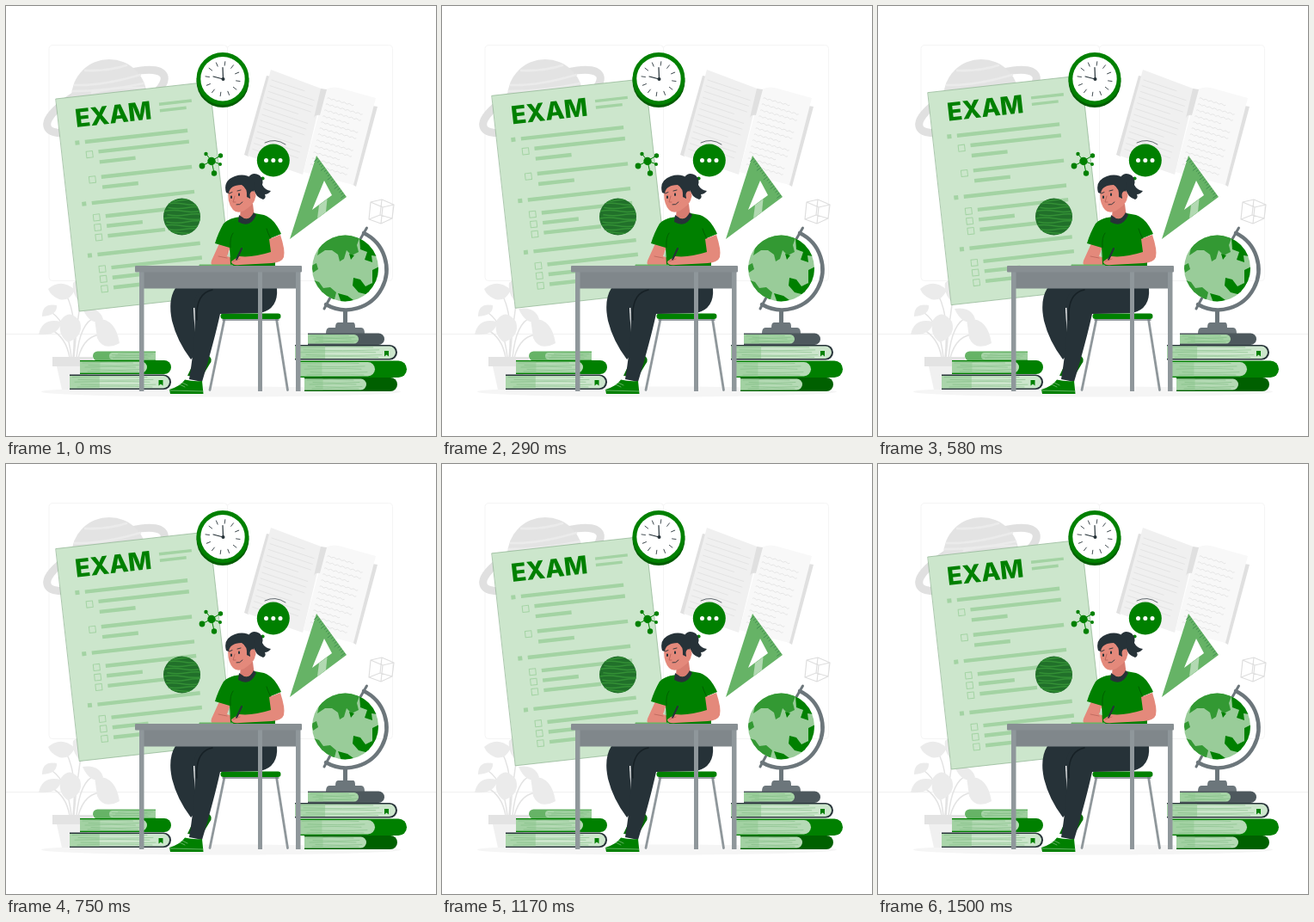
Write an HTML page that moves like this. It is 500 px wide and 500 px high and loops after 1540 ms.

```html
<!DOCTYPE html>
<html lang="en">
<head>
<meta charset="utf-8">
<title>Exam</title>
<style>
  html, body { margin: 0; width: 100%; height: 100%; overflow: hidden; background: #fff; }
  svg { display: block; width: 100%; height: 100%; }
  text { font: 800 29px Inter, "Open Sans", sans-serif; }
</style>
</head>
<body>
<svg viewBox="0 0 500 500" fill="none" stroke-linecap="round" stroke-linejoin="round">
  <defs>
    <clipPath id="ballClip"><circle cx="204.5" cy="245" r="21.5"/></clipPath>
    <clipPath id="globeClip"><circle cx="394.5" cy="305" r="38.5"/></clipPath>
  </defs>

  <g id="backdrop" stroke="#f5f5f5">
    <rect x="50" y="45.500" width="207.500" height="274" rx="4"/>
    <rect x="257.500" y="45.500" width="192" height="274" rx="4"/>
    <path d="M0 381.500H500" stroke="#f1f1f1"/>
  </g>
  <ellipse cx="250" cy="448.500" rx="209" ry="6" fill="#f5f5f5"/>

  <g id="planet">
    <ellipse cx="116" cy="111" rx="74" ry="23" transform="rotate(-24 116 111)" stroke="#e0e0e0" stroke-width="9"/>
    <circle cx="120" cy="106" r="44" fill="#e3e3e3"/>
    <path d="M80 92q32 1 76-12M78 99q40 0 82-9M92 75q26 1 48-6M100 101q24-7 60-6" stroke="#ebebeb" stroke-width="2.500"/>
  </g>

  <g id="plant" fill="#ebebeb" stroke="#e3e3e3" stroke-width="1.500">
    <path d="M78 409Q83 360 70 336M76 409Q72 370 54 357M74 409Q70 385 52 376M79 409Q82 370 90 322M82 409Q86 368 104 362M84 409Q92 380 116 382" fill="none"/>
    <g stroke="none">
      <path d="M49 329Q64 316 80 330Q74 344 62 341Q52 337 49 329ZM42 361Q42 345 59 348Q60 360 42 361ZM38 382Q42 362 64 367Q62 384 38 382ZM64 365Q74 351 86 367Q91 384 72 391Q59 382 64 365ZM78 322Q90 312 95 326Q98 342 88 346Q76 336 78 322ZM89 352Q108 349 113 364Q99 374 89 352ZM103 364Q127 361 132 392Q113 402 106 386Z"/>
    </g>
    <path d="M59 419H96L92 446H65Z" fill="#f0f0f0" stroke="none"/>
    <path d="M54 408H101V419H54Z" fill="#e3e3e3" stroke="none"/>
  </g>

  <g id="notebook">
    <path d="M303 81L308 82L282 175L277 173ZM426 116L432 117L407 210L402 207Z" fill="#e0e0e0"/>
    <path d="M308 74L369 97L345 196L281 174Z" fill="#f0f0f0"/>
    <path d="M371 97Q382 92 394 97L430 107L404 208L346 193Z" fill="#f8f8f8"/>
    <path d="M366 96L373 97L365 127Q360 126 358 130Z" fill="#e0e0e0"/>
    <g id="writing" stroke="#e0e0e0" stroke-width=".8"></g>
  </g>

  <g id="cube" stroke="#dedede" stroke-width="1.200">
    <path d="M424 228L437 225L451 231L449 247L436 253L422 248ZM424 228L438 234L451 231M438 234L436 253M437 225L435 243L422 248M435 243L449 247"/>
  </g>

  <g id="sheet"></g>

  <g id="ball" clip-path="url(#ballClip)">
    <circle cx="204.500" cy="245" r="22" fill="#21702a"/>
    <g id="bands" stroke="#339035" stroke-width="1.500"></g>
  </g>

  <g id="molecule">
    <path d="M228 186L239 180L232.500 172M249.500 174L239 180L249 184M239 180L242 194" stroke="#008000"/>
    <g fill="#008000">
      <circle cx="239" cy="180.500" r="4.700"/><circle cx="228" cy="186" r="3.400"/>
      <circle cx="232.500" cy="172" r="2.200"/><circle cx="249.500" cy="174" r="2.700"/>
      <circle cx="249" cy="184" r="2"/><circle cx="242" cy="194.500" r="3.200"/>
    </g>
  </g>

  <g id="clock">
    <circle cx="252" cy="87.500" r="30.500" fill="#005c00"/>
    <circle cx="252" cy="84.500" r="30.500" fill="#008000"/>
    <circle cx="252" cy="84.700" r="25.700" fill="#fff"/>
    <g id="ticks" stroke="#263238" stroke-width=".8"></g>
    <path d="M252.500 85L252 71.500M252.500 85L241 82" stroke="#263238" stroke-width="1.200"/>
    <circle cx="252.500" cy="85" r="2" fill="#263238"/>
  </g>

  <g id="bubble">
    <circle cx="310.800" cy="179.500" r="19" fill="#008000"/>
    <circle cx="298.500" cy="200.500" r="2.100" fill="#008000"/>
    <path d="M301 159Q313 153 325 161" stroke="#263238" stroke-width=".7"/>
    <path d="M302.500 179.500h.01M310.800 179.500h.01M319 179.500h.01" stroke="#fff" stroke-width="5"/>
  </g>

  <g id="setSquare">
    <path fill="#66b366" fill-rule="evenodd" d="M361 174L396 222L330 271ZM370 203L356 237L379 220Z"/>
    <path d="M364 231.500L373.500 224.500L372 239.500L362 247Z" fill="#b2d9b2"/>
    <g id="marks" stroke="#33804a" stroke-width=".7"></g>
  </g>

  <g id="globe">
    <path d="M416 264A47 47 0 1 1 372 347" stroke="#6c767b" stroke-width="4.500"/>
    <path d="M419.500 258L412 271M370 352L377 339" stroke="#6c767b" stroke-width="3"/>
    <path d="M392 352H397V368H404Q406 368 406 374H413Q417 374 417 381H372Q372 374 376 374H383Q383 368 386 368H392Z" fill="#6c767b"/>
    <circle cx="394.500" cy="305" r="38.500" fill="#99cc99"/>
    <g clip-path="url(#globeClip)">
      <path d="M364 281Q378 264 398 266L411 270L408 278L410 286L402 290L396 284L393 294L388 297L386 289L379 284L371 284L362 290ZM355 302L361 299L363 306L357 310ZM355 318L364 321L369 328L377 327L384 333L381 345L364 338Z" fill="#339933"/>
      <path d="M411 270L424 277L432 291L425 290L426 298L417 295L420 286L412 283ZM399 288L405 290L401 295ZM426 307L434 303L433 324L426 322ZM404 316L412 318L418 326L430 320L422 336L410 333L403 325ZM386 334L397 337L404 342L390 345Z" fill="#008000"/>
    </g>
  </g>

  <g id="books"></g>

  <g id="chair">
    <path d="M254 364L237 446.500M314.500 364L327.500 446.500" stroke="#8f979b" stroke-width="2.800"/>
    <path d="M252 365H317" stroke="#737d82" stroke-width="1.500"/>
    <rect x="249.500" y="357.500" width="70" height="6.500" rx="3.200" fill="#008000"/>
  </g>

  <g id="student">
    <path d="M211 430L219 413L236 407Q241 411 237 416L228 431Z" fill="#006b00"/>
    <path d="M197 328H262L250 348L218 351Q219 378 223 402L215 411Q199 390 193 366Q188 342 197 328Z" fill="#263238"/>
    <path d="M315 328Q317 352 296 357L249 358Q242 390 228 437L213 434Q222 380 219 346Q221 329 234 328Z" fill="#263238"/>
    <path d="M222 365Q220 334 240 330" stroke="#172126" stroke-width="1.500"/>
    <path d="M190 446Q203 442 208 434.500Q218 437 228 436L229.500 451H191Z" fill="#008000"/>
    <path d="M190 447L229 448M205 438L211 441M202 440L208 443" stroke="#8fc88f" stroke-width=".7"/>

    <path d="M249 274L239 296Q237 302 243 302H262L266 294L257 291L262 277Z" fill="#e4897b"/>
    <path d="M273 232L287 230L289 246Q280 255 272 246Z" fill="#d87c70"/>
    <path d="M273 245Q260 246 253 253Q247 263 243 276L260 281L261 302H313Q314 288 308 270L320 265Q312 247 300 243L289 241Q281 252 273 245Z" fill="#008000"/>
    <path d="M261 281Q260 269 264 264M308 271Q304 263 303 259" stroke="#005f00"/>
    <path d="M271 243L270 251Q284 259 291 243L288 240Q282 252 274 245Z" fill="#263238"/>
    <path d="M306 271L319 266Q325 284 323 292Q321 298 309 299L272 301Q262 302 262 297L271 291Q286 293 308 286Z" fill="#e4897b"/>
    <path d="M274 282L268 295" stroke="#263238" stroke-width="2"/>
    <path d="M264 297L272 294M247 291L257 293" stroke="#b9655b" stroke-width=".8"/>

    <path d="M282 199Q287 192 295 197Q300 202 298 208Q301 214 308 215Q305 219 301 219Q303 223 299 225Q290 222 288 213Z" fill="#263238"/>
    <path d="M259 210Q256 228 264 237Q269 242 277 238L285 232Q292 225 289 216Q283 203 271 203Z" fill="#e4897b"/>
    <path d="M256 217Q252 203 266 198Q278 194 286 201Q293 208 288 216Q284 213 284 224L280 222Q281 212 274 208Q260 208 259 218Z" fill="#263238"/>
    <ellipse cx="287" cy="220" rx="3.500" ry="4.300" fill="#e4897b"/>
    <path d="M262 221.500v1.500M271 218.500v1.500" stroke="#263238" stroke-width="2"/>
    <path d="M259.500 218L263 216.500M269 215L273 214M268 231Q272 232 275 228" stroke="#263238" stroke-width=".9"/>
    <path d="M266 221L264 228L267 228" stroke="#b9655b" stroke-width=".9"/>
  </g>

  <g id="desk">
    <path d="M225 300.500H263L265 302.500H224Z" fill="#66b366"/>
    <rect x="160" y="308" width="178" height="20.500" fill="#80878b"/>
    <path d="M155 309h5.500V448h-5.500ZM337 309h5.500V448h-5.500ZM293 309h5V448h-5Z" fill="#8f979b"/>
    <rect x="150" y="302" width="194" height="7.500" rx="1" fill="#888f93"/>
  </g>
</svg>

<script>
const $ = id => document.getElementById(id);
const range = (n, fn) => Array.from({ length: n }, (_, i) => fn(i)).join("");
const path = (d, attrs = "") => `<path d="${d}" ${attrs}/>`;

// Exam sheet, drawn upright in its own coordinates
const bar = (x, y, w, h = 4.4) => `<rect x="${x}" y="${y - h / 2}" width="${w}" height="${h}" fill="#a3d3a3"/>`;
const box = y => `<rect x="28" y="${y - 3.7}" width="7.4" height="7.4" stroke="#a3d3a3"/>`;
const heading = y => bar(16.5, y, 5, 5) + bar(28, y, 120);
const pair = y => box(y + 2) + bar(42.3, y, 106) + bar(42.3, y + 12, 42);
const list = y => heading(y) + [106, 42, 67].map((w, i) => {
  const rowY = y + 16.8 + i * 11.6;
  return box(rowY + .5) + bar(42.3, rowY, w);
}).join("");

$("sheet").innerHTML = `<g transform="translate(58 107) rotate(-6.35)">
  <rect y="1" width="179.500" height="248.500" fill="#cce6cc" stroke="#8fb592" stroke-width=".7"/>
  <text x="19.500" y="36.500" fill="#008000">EXAM</text>
  ${bar(118.5, 20.5, 38, 3.4)}${bar(118.5, 28, 31, 3.4)}
  ${heading(54.5)}${pair(67.5)}${pair(97)}${list(126)}${list(186.3)}</g>`;

// Books lie with the spine on the right
function book(x, y, w, h, cover, pageWidth, tint = "#b5dab5") {
  const slab = (x, y, w, h) => `M${x} ${y}H${x + w - h / 2}a${h / 2} ${h / 2} 0 0 1 0 ${h}H${x}Z`;
  const lines = range(5, i => {
    const lineY = y + 3 + i * (h - 6) / 4;
    return `M${x + 3 + i * 7 % 11} ${lineY}q${pageWidth * .4} ${i % 2 ? 1.5 : -1.5} ${pageWidth * .75} 0`;
  });
  return path(slab(x, y, w, h), `fill="${cover}"`) +
    path(slab(x, y + 1.6, pageWidth, h - 3.2), `fill="${tint}"`) +
    path(`M${x} ${y + 1.6}h${pageWidth * .3}v${h - 3.2}h${-pageWidth * .3}Z`, 'fill="#99cc99" opacity=".65"') +
    path(lines, 'stroke="#80bd84" stroke-width=".6"');
}
const bookmark = (x, y) => path(`M${x} ${y}h5v6.500l-2.500-2l-2.500 2Z`, 'fill="#008000"');

$("books").innerHTML =
  book(351, 380.5, 89, 13.5, "#4d585d", 59, "#a6d4a6") +
  book(336, 394, 119, 17.5, "#263238", 117, "#cce6cc") + bookmark(440, 401) +
  book(341, 412.5, 125, 19.5, "#008000", 88) +
  book(347, 432, 108, 16, "#006000", 72) +
  `<g transform="matrix(-1 0 0 1 275 0)">${book(101, 401.5, 73, 11, "#66b366", 54, "#a6d4a6")}</g>` +
  book(86, 412, 106, 16, "#008000", 78) +
  book(74, 428.5, 118, 17.5, "#263238", 116, "#cce6cc") + bookmark(177.5, 435);

$("ticks").innerHTML = range(12, i =>
  path("M252 64.500V69", `transform="rotate(${i * 30 + 8} 252 84.700)"`));

$("marks").innerHTML = path(range(17, i =>
  `M${362.5 + i * 1.95} ${177.5 + i * 2.67}l${i % 4 ? "-2 1.500" : "-4 3"}`));

$("bands").innerHTML = path(range(10, i =>
  `M${181 + i * 13 % 9} ${226 + i * 4.2}q11 ${i % 2 ? -2 : 2} 22 0t24 ${i % 3 - 1}`));

$("writing").innerHTML = path(
  range(13, i => `M${309 - i * 1.85} ${86 + i * 6.7}l${i % 4 ? 51 : 38} ${i % 4 ? 17 : 12.7}`) +
  range(12, i => `M${374 - i * 1.8} ${107 + i * 7}` +
    range(i % 3 ? 14 : 10, j => `q1 ${j % 2 ? 2 : -1} 3 .850`)));

const RISE = 9.5, LOOP = 1540, TRAVEL = 1500;
function frame() {
  const p = Math.min(performance.now() % LOOP / TRAVEL, 1);
  const lift = RISE * (1 - Math.abs(2 * p - 1));
  $("sheet").setAttribute("transform", `translate(0 ${-lift})`);
  requestAnimationFrame(frame);
}
frame();
</script>
</body>
</html>
```
